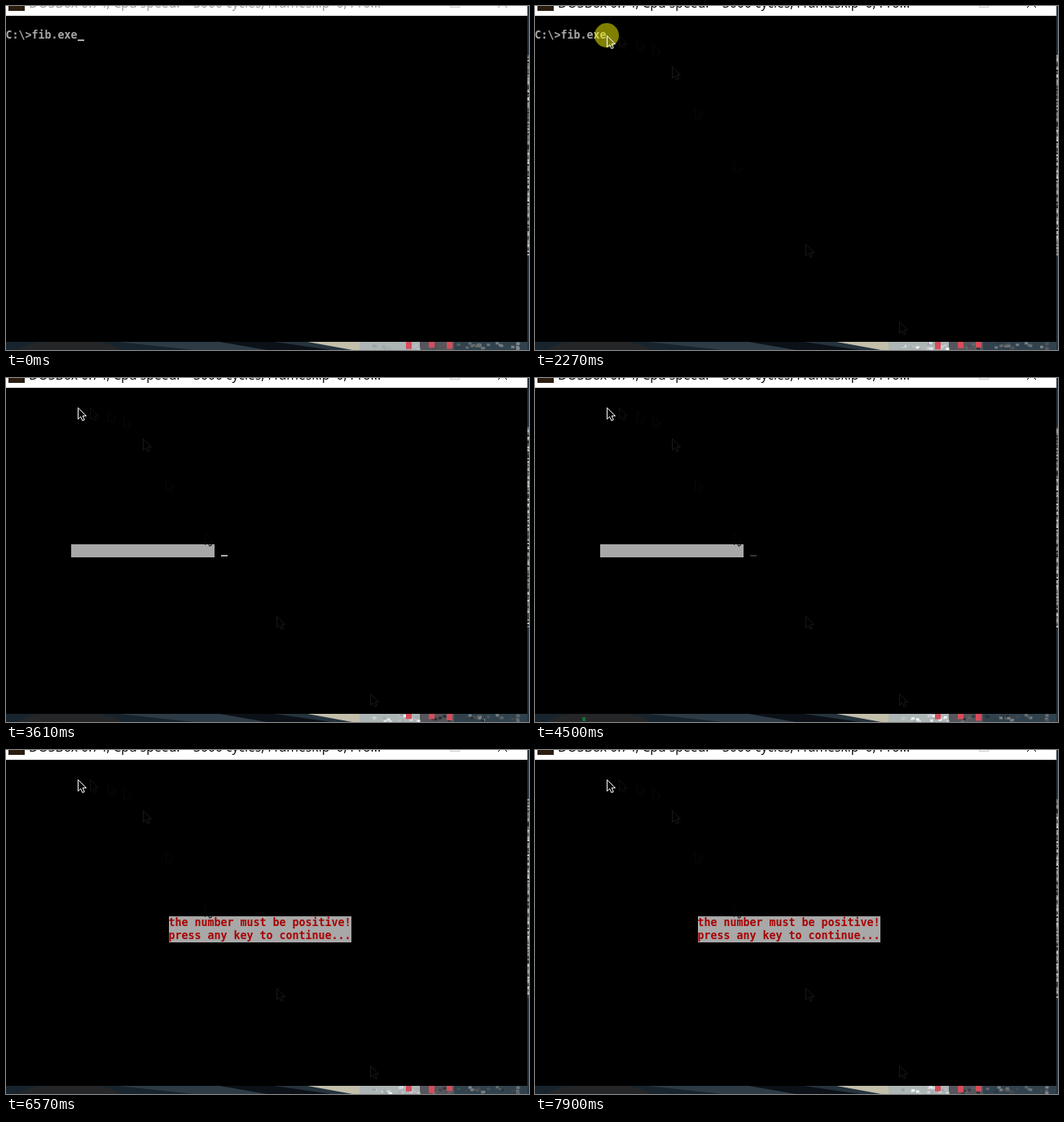
Write an HTML page with a canvas that moves like this. It is 642 px wide and 422 px high and loops after 7990 ms.

```html
<!DOCTYPE html>
<html lang="en">
<head>
<meta charset="utf-8">
<title>Fibonacci console</title>
<style>
  html, body { margin: 0; width: 100%; height: 100%; overflow: hidden; background: #000; }
  canvas { display: block; }
</style>
</head>
<body>
<canvas id="stage" width="642" height="422"></canvas>
<script>
const ctx = document.getElementById('stage').getContext('2d');
const LOOP = 7990;
const GRAY = '#a8a8a8';
const CELL = 8, ROW = 16, TOP = 12;
const TIMES = { focus: 1500, release: 2400, run: 3480, minus: 5150, five: 5480, error: 6200 };

// Pointer path: time, x, y, brightness of the trace left behind
const PATH = [
  [900, 505, 434, 0], [960, 447, 387, 24], [1030, 332, 292, 24],
  [1100, 244, 190, 7], [1170, 196, 123, 8], [1240, 168, 74, 26],
  [1310, 144, 46, 8], [1370, 125, 40, 8], [1420, 103, 36, 17], [1460, 88, 36, 0]
];

function rect(color, x, y, w, h) {
  ctx.fillStyle = color;
  ctx.fillRect(x, y, w, h);
}

function shape(color, ...points) {
  ctx.fillStyle = color;
  ctx.beginPath();
  points.forEach(([x, y]) => ctx.lineTo(x, y));
  ctx.closePath();
  ctx.fill();
}

function noise(n) {
  const v = Math.sin(n * 127.1 + 11.7) * 43758.5453;
  return v - Math.floor(v);
}

function dosText(text, col, row, color) {
  ctx.font = 'bold 13.29px "DejaVu Sans Mono", monospace';
  ctx.fillStyle = color;
  ctx.fillText(text, col * CELL - 0.5, TOP + row * ROW + 12);
}

function caret(col, row, t) {
  const lit = (t + 57) % 457 < 228;
  if (lit || row > 1) rect(lit ? GRAY : '#343434', col * CELL, TOP + row * ROW + 13, CELL, 2);
}

function drawBackdrop(t) {
  const step = Math.floor(t / 80);
  rect('#18242d', 0, 412, 642, 10);
  ctx.fillStyle = '#242628';
  ctx.beginPath();
  ctx.ellipse(78, 424, 63, 14, 0, 0, Math.PI * 2);
  ctx.fill();

  shape('#2c3b46', [138, 412], [265, 412], [330, 422], [230, 422]);
  shape('#0c1117', [262, 412], [330, 412], [400, 422], [320, 422]);
  shape('#25333d', [330, 412], [388, 412], [430, 422], [400, 422]);
  shape('#c3bfab', [370, 412], [436, 412], [436, 422], [425, 422]);
  rect('#adb5b5', 434, 412, 76, 10);
  rect('#55565c', 508, 412, 42, 10);
  rect('#30424e', 550, 412, 92, 10);
  for (let i = 0; i < 50; i++) {
    const x = 434 + noise(i) * 195;
    const y = 412 + noise(i + 60) * 8;
    const light = (x < 515 ? 150 : 35) + noise(i + step * 31) * 95;
    rect(`rgb(${light},${light + 6},${light + 9})`, x, y, 4, 3);
  }
  [491, 519, 541].forEach((x, i) => {
    rect('#d74c5b', x, 412, 7, 6 + noise(step + i * 9) * 4);
  });
  if (t > 4400 && t < 4620) rect('#176a38', 58, 416, 4, 5);

  rect('#26343e', 640, 0, 2, 422);
  for (let y = 60; y < 305; y += 2) {
    const v = 30 + noise(y + step) * 170;
    rect(`rgb(${v},${v + 7},${v + 10})`, 640, y, 2, 2);
  }
}

function drawTitleBar(active) {
  const ink = active ? '#000' : '#999';
  rect('#fff', 0, 0, 640, TOP);
  rect('#2a1d10', 3, 0, 20, 6);
  ctx.font = '15.78px "Open Sans", sans-serif';
  ctx.fillStyle = ink;
  ctx.fillText('DOSBox 0.74, Cpu speed:\u00a0\u00a0\u00a0 3000 cycles, Frameskip\u00a0 0, Pro...', 28, 2);
  ctx.lineWidth = 1;
  ctx.strokeStyle = '#ccc';
  ctx.strokeRect(545.5, -9.5, 11, 11);
  ctx.strokeStyle = ink;
  ctx.beginPath();
  ctx.moveTo(604, 2); ctx.lineTo(615, -9);
  ctx.moveTo(615, 2); ctx.lineTo(604, -9);
  ctx.stroke();
}

function pointerAt(t) {
  const next = PATH.findIndex(p => p[0] > t);
  if (next === 0) return null;
  if (next < 0) return PATH[PATH.length - 1].slice(1, 3);
  const [t0, x0, y0] = PATH[next - 1];
  const [t1, x1, y1] = PATH[next];
  const k = (t - t0) / (t1 - t0);
  return [x0 + (x1 - x0) * k, y0 + (y1 - y0) * k];
}

const ARROW = new Path2D('M.5 .5V14.5L3.7 11.5L5.9 16.3L8.3 15.2L6.2 10.6H10.5Z');

function drawArrow(x, y, color) {
  ctx.save();
  ctx.translate(x, y);
  ctx.lineWidth = 1;
  ctx.strokeStyle = color;
  ctx.stroke(ARROW);
  ctx.restore();
}

function drawPointer(t, clicked) {
  for (const [time, x, y, v] of PATH) {
    if (v && t > time + 60) drawArrow(x, y, `rgb(${v},${v},${v})`);
  }
  const position = pointerAt(t);
  if (!position) return;
  if (clicked) {
    ctx.fillStyle = 'rgba(255,255,0,.5)';
    ctx.beginPath();
    ctx.arc(...position, 15, 0, Math.PI * 2);
    ctx.fill();
  }
  drawArrow(...position, '#fff');
}

function drawConsole(t, clicked) {
  if (t < TIMES.run) {
    dosText('C:\\>fib.exe', 0, 1, GRAY);
    if (!clicked) caret(11, 1, t);
  } else if (t < TIMES.error) {
    const typed = t < TIMES.minus ? '' : t < TIMES.five ? '-' : '-5';
    rect(GRAY, 80, 204, 176, ROW);
    dosText(typed, 33, 12, GRAY);
    if (typed.length < 2) caret(33 + typed.length, 12, t);
  } else {
    rect(GRAY, 200, 204, 224, 2 * ROW);
    dosText('the number must be positive!', 25, 12, '#a80000');
    dosText('press any key to continue...', 25, 13, '#a80000');
  }
}

function draw(t) {
  const clicked = t >= TIMES.focus && t < TIMES.release;
  drawBackdrop(t);
  drawTitleBar(t >= TIMES.focus);
  ctx.save();
  ctx.beginPath();
  ctx.rect(0, TOP, 640, 400);
  ctx.clip();
  rect('#000', 0, TOP, 640, 400);
  drawConsole(t, clicked);
  drawPointer(t, clicked);
  ctx.restore();
}

const start = performance.now();
function tick() {
  draw((performance.now() - start) % LOOP);
  requestAnimationFrame(tick);
}
tick();
</script>
</body>
</html>
```
